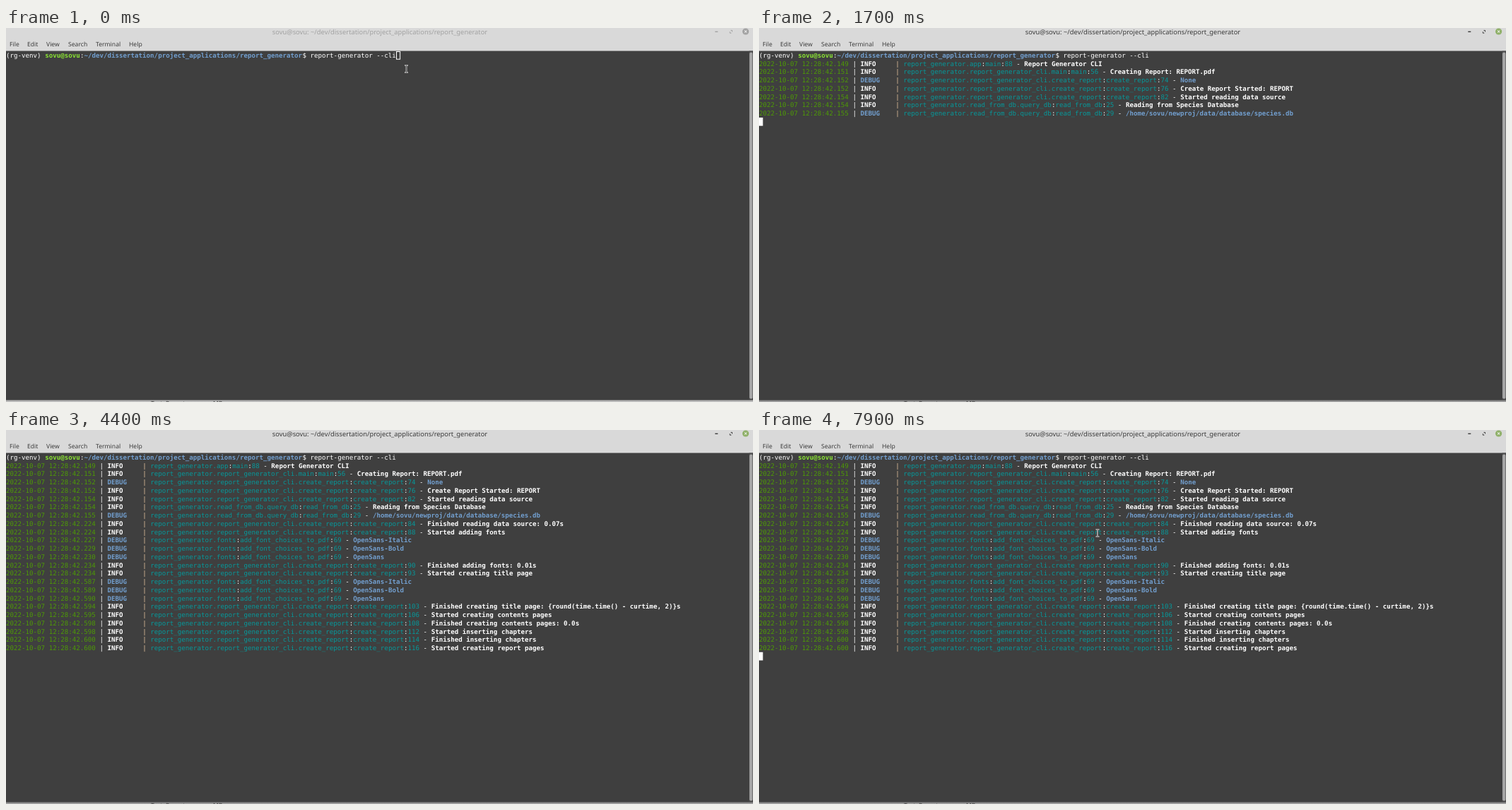
Write an HTML page that moves like this. It is 1057x530 px and loops after 8000 ms.

```html
<!DOCTYPE html>
<html lang="en">
<head>
<meta charset="utf-8">
<title>Terminal</title>
<style>
  html, body { margin: 0; width: 100%; height: 100%; overflow: hidden; background: #3f3f3f; }
  svg { display: block; }
  text { white-space: pre; text-rendering: geometricPrecision; }
  .ui { font: 8.6px "Noto Sans", sans-serif; fill: #3c3c3c; }
  .title { font-size: 9.35px; text-anchor: middle; }
  .mono { font: 9.17px "DejaVu Sans Mono", monospace; fill: #fff; }
  .bold { font-weight: bold; }
  .user { fill: #8ae234; }
  .blue { fill: #729fcf; }
  .time { fill: #4e9a06; }
  .cyan { fill: #06989a; }
  .bar { fill: #e6c29c; }
</style>
</head>
<body>
<svg width="1057" height="530" viewBox="0 0 1057 530">
  <defs>
    <linearGradient id="shade" x2="0" y2="1">
      <stop id="shadeTop" offset="0"/>
      <stop id="shadeEnd" offset="1"/>
    </linearGradient>
  </defs>
  <rect width="1057" height="530" fill="#3f3f3f"/>
  <rect width="1057" height="32.5" fill="#d9d9d9"/>
  <text class="ui title" id="title" x="529" y="9"></text>
  <g id="buttons" fill="none">
    <path d="M1003.3 5.3h4"/>
    <path d="M1024.3 5.2v2h2M1025.5 3.4h2v2" stroke-width="1"/>
    <circle id="close" cx="1046.6" cy="5" r="4.6" stroke="none"/>
    <path d="M1044.9 3.3l3.4 3.4m0-3.4l-3.4 3.4" stroke="#fff" stroke-width="1"/>
  </g>
  <g class="ui" id="menu"></g>
  <rect x="1051.5" y="32.5" width="5.5" height="494" fill="#505050"/>
  <rect x="1052" y="34.5" width="4.4" height="491" rx="2.2" fill="#a6a6a6"/>
  <rect y="527" width="1057" height="3" fill="url(#shade)"/>
  <text class="ui" x="205" y="535.4">Text: Report</text>
  <text class="ui" x="293" y="535.4">MB</text>
  <g class="mono" id="screen"></g>
  <rect id="cursor" stroke="#fff"/>
  <g id="pointer" fill="none">
    <path d="M-2.3-5.2h1.5l.8.7.8-.7h1.5M0-4.5v9M-2.3 5.2h1.5l.8-.7.8.7h1.5" stroke="#f4f4f4" stroke-width="1.7"/>
    <path d="M-2-5.2h4M0-5v10M-2 5.2h4" stroke="#111" stroke-width=".6"/>
  </g>
</svg>
<script>
const LOOP = 8000, CELL = 5.52, LINE = 11.74, TOP = 33;
const USER = 'sovu';
const PATH = '~/dev/dissertation/project_applications/report_generator';
const $ = id => document.getElementById(id);

function add(parent, tag, attrs, content = '') {
  const node = document.createElementNS('http://www.w3.org/2000/svg', tag);
  for (const key in attrs) node.setAttribute(key, attrs[key]);
  node.textContent = content;
  return parent.appendChild(node);
}

// One terminal row from [class, text] pieces, each starting on its own column.
function addRow(row, pieces) {
  const group = add($('screen'), 'g', {});
  let column = 0;
  for (const [style, content] of pieces) {
    add(group, 'text', { class: style, x: column * CELL, y: TOP + 9 + row * LINE }, content);
    column += content.length;
  }
  return group;
}

const create = line => `report_generator_cli.create_report:create_report:${line}`;
const query = line => `read_from_db.query_db:read_from_db:${line}`;
const fonts = (...times) => ['-Italic', '-Bold', ''].map((face, i) =>
  [times[i], 'DEBUG', 'fonts:add_font_choices_to_pdf:69', 'OpenSans' + face]);

const log = [
  [149, 'INFO', 'app:main:88', 'Report Generator CLI'],
  [151, 'INFO', 'report_generator_cli.main:main:56', 'Creating Report: REPORT.pdf'],
  [152, 'DEBUG', create(74), 'None'],
  [152, 'INFO', create(76), 'Create Report Started: REPORT'],
  [154, 'INFO', create(82), 'Started reading data source'],
  [154, 'INFO', query(25), 'Reading from Species Database'],
  [155, 'DEBUG', query(29), `/home/${USER}/newproj/data/database/species.db`],
  [224, 'INFO', create(84), 'Finished reading data source: 0.07s'],
  [224, 'INFO', create(88), 'Started adding fonts'],
  ...fonts(227, 229, 230),
  [234, 'INFO', create(90), 'Finished adding fonts: 0.01s'],
  [234, 'INFO', create(93), 'Started creating title page'],
  ...fonts(587, 589, 590),
  [594, 'INFO', create(103), 'Finished creating title page: {round(time.time() - curtime, 2)}s'],
  [595, 'INFO', create(106), 'Started creating contents pages'],
  [598, 'INFO', create(108), 'Finished creating contents pages: 0.0s'],
  [598, 'INFO', create(112), 'Started inserting chapters'],
  [600, 'INFO', create(114), 'Finished inserting chapters'],
  [600, 'INFO', create(116), 'Started creating report pages'],
];

$('title').textContent = `${USER}@${USER}: ${PATH}`;
const menu = { File: 5, Edit: 30, View: 57, Search: 88, Terminal: 127, Help: 174 };
for (const name in menu) add($('menu'), 'text', { x: menu[name], y: 26 }, name);

addRow(0, [['', '(rg-venv) '], ['bold user', `${USER}@${USER}`], ['', ':'],
  ['bold blue', PATH], ['', '$ report-generator --cli']]);

const rows = log.map(([ms, level, origin, message], i) => {
  const style = level === 'DEBUG' ? 'bold blue' : 'bold';
  const [module, func, line] = origin.split(':');
  return addRow(i + 1, [
    ['time', `2022-10-07 12:28:42.${ms}`], ['', ' | '], [style, level.padEnd(8)], ['bar', ' | '],
    ['cyan', 'report_generator.' + module], ['', ':'], ['cyan', func], ['', ':'], ['cyan', line],
    ['', ' - '], [style, message],
  ]);
});

// Value of the last [time, ...value] step already reached.
const at = (steps, t) => steps.findLast(step => t >= step[0]).slice(1);
const printed = [[0, 0], [1700, 7], [1800, 14], [2200, 23]];
const pointerSteps = [[0, 566.5, 58], [1400], [7100, 560, 67], [7200, 409, 136],
  [7600, 440, 132], [7700, 490, 129], [7800, 500, 136], [7900, 479, 146]];

function set(id, attrs) {
  for (const key in attrs) $(id).setAttribute(key, attrs[key]);
}
const show = (node, visible) => { node.style.display = visible ? '' : 'none'; };

function draw(t) {
  const focused = t >= 200;
  $('title').style.fill = focused ? '#3c3c3c' : '#a2a2a2';
  set('buttons', { stroke: focused ? '#3c3c3c' : '#a2a2a2', 'stroke-width': 1.4 });
  set('close', { fill: focused ? '#8fb069' : '#a2a2a2' });
  set('shadeTop', { 'stop-color': focused ? '#5c5c5c' : '#858585' });
  set('shadeEnd', { 'stop-color': focused ? '#b4b4b4' : '#d2d2d2' });

  const [count] = at(printed, t);
  rows.forEach((row, i) => show(row, i < count));

  const entered = t >= 1400, solid = t >= 300;
  const blinkStart = entered ? 1400 : 300;
  const inset = solid ? 0 : 0.5;
  show($('cursor'), !solid || Math.floor((t - blinkStart) / 600) % 2 === 0);
  set('cursor', {
    x: (entered ? 0 : 100 * CELL) + inset,
    y: TOP + (entered ? count + 1 : 0) * LINE + inset,
    width: CELL - inset * 0.8, height: LINE - inset * 2,
    fill: solid ? '#fff' : 'none', 'stroke-width': solid ? 0 : 1,
  });

  const [x, y] = at(pointerSteps, t);
  show($('pointer'), x !== undefined);
  if (x !== undefined) set('pointer', { transform: `translate(${x} ${y})` });
}

const start = performance.now();
function tick() {
  draw((performance.now() - start) % LOOP);
  requestAnimationFrame(tick);
}
tick();
</script>
</body>
</html>
```
